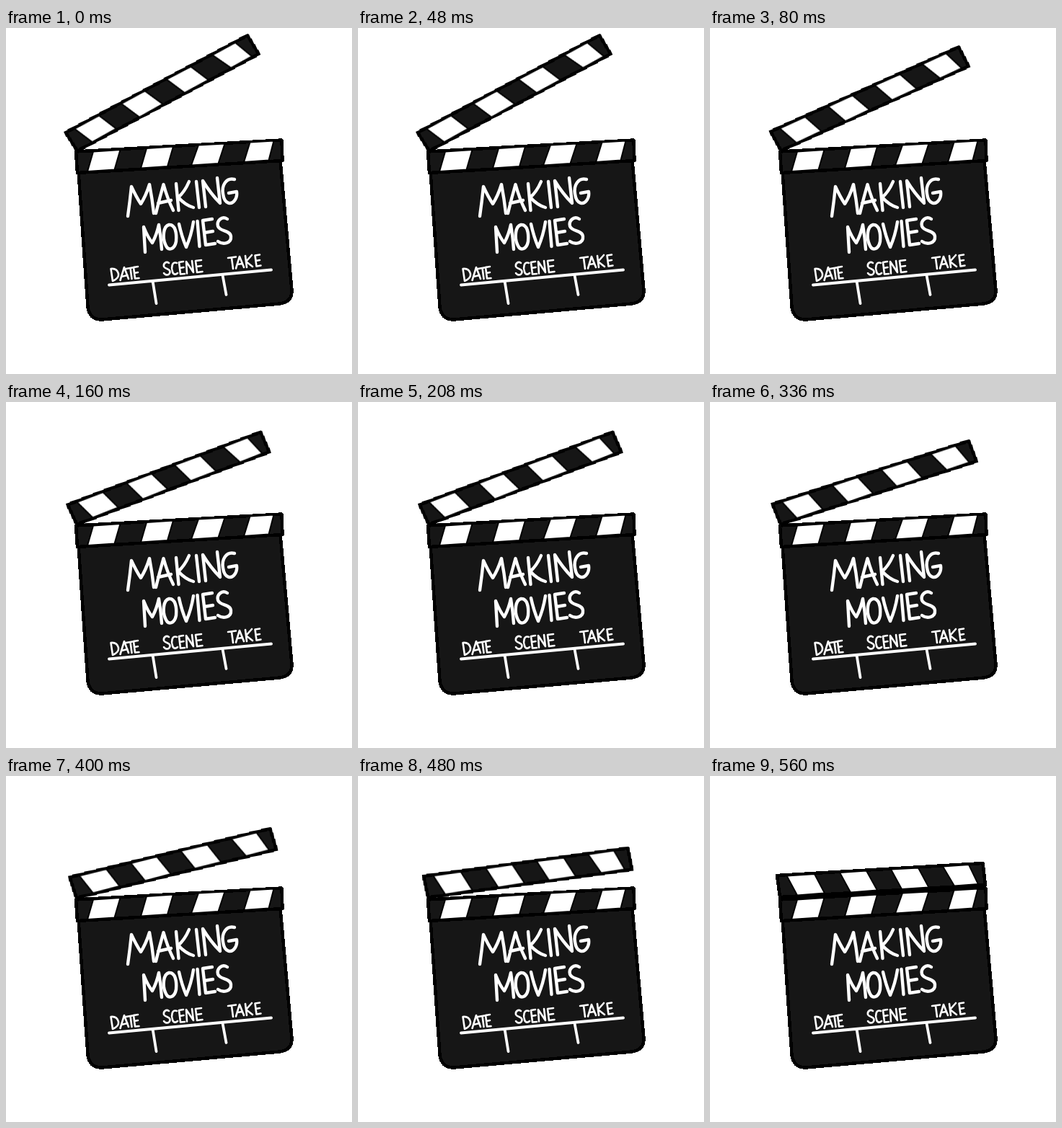
Recreate the animation shown at these times as an HTML page. Size 480x480 px, loop 0.64 s.

```html
<!DOCTYPE html>
<html lang="en">
<head>
<meta charset="utf-8">
<title>Making movies</title>
<style>
  html, body { margin: 0; width: 100%; height: 100%; overflow: hidden; background: #fff; }
  svg { display: block; width: 100%; height: 100%; }
  .board { fill: #161616; stroke: #000; stroke-width: 4.5; stroke-linejoin: round; shape-rendering: crispEdges; }
  .stripe { fill: #fff; stroke: #000; stroke-width: 2; }
  .ink { fill: none; stroke: #fff; stroke-linecap: round; stroke-linejoin: round; }
  .title { stroke-width: 4.4; }
  .label { stroke-width: 2.6; }
  .rule { stroke-width: 3.8; }
  #arm { transform-origin: 103.8px 165.1px; }
</style>
</head>
<body>
<svg viewBox="0 0 480 480" role="img" aria-label="Clapperboard: Making Movies. Date, Scene, Take">
  <path class="board" d="M100.500 199L113.500 387Q116 405 133 404.500L380 382.500Q397 380 396.500 364L380.500 183Z"/>
  <g id="base"><path class="board" d="M97 171.500L382.500 155.500L383.500 184L99 201Z"/></g>
  <g id="arm"><path class="board" d="M93 138L378.500 121L382 151L97 168Z"/></g>
  <g id="lettering"></g>
  <path class="ink rule" d="M143 356.500L368 335.500M203.500 351L208.500 382M300.500 343L305.500 370"/>
</svg>
<script>
  const NS = "http://www.w3.org/2000/svg";
  const LOOP = 640;

  function addPath(parent, className, d) {
    const path = document.createElementNS(NS, "path");
    path.setAttribute("class", className);
    path.setAttribute("d", d);
    parent.append(path);
  }

  const arm = document.getElementById("arm");
  const base = document.getElementById("base");
  const lettering = document.getElementById("lettering");

  // White stripes on both sticks
  for (const d of [
    "M106.500 138.500L145 136L159 162.500L121 165.500Z",
    "M180 134L217 131.500L232 158.500L195 161.500Z",
    "M251 129.500L289 127.500L303.500 154.500L266 157Z",
    "M323 125.500L359 123L372 150L339 152.500Z"
  ]) addPath(arm, "stripe", d);

  for (const d of [
    "M121 171.500L158.500 169L150.500 196.500L113 199Z",
    "M195 167L232 164.500L224 192L187 194.500Z",
    "M267 162.500L303.500 160.500L294.500 188L257 190.500Z",
    "M338.500 158.500L371.500 156.500L364.500 183.500L330 186Z"
  ]) addPath(base, "stripe", d);

  // Hand lettering, one stroke path per letter
  const words = [
    ["title", [
      "M169 261Q172 240 174 220Q181 235 187 244Q194 233 199 217Q203 238 205 257",
      "M208 257Q213 236 218.500 217Q224 237 232 253M211 243L229 239",
      "M236 216L239.500 253M254 213Q248 227 239 235Q249 246 260 249",
      "M264 213L268 249",
      "M277 248L273 212Q284 230 297 243L293 208",
      "M317 210C305 207 299 219 301 230C303 245 313 246 318 238Q321 233 320 227L309 229"
    ]],
    ["title", [
      "M193 311L191 276Q197 291 203 298Q209 287 212 273Q215 291 216 307",
      "M226 273C218 275 217 291 221 300C225 311 234 307 236 296C237 285 235 272 226 273Z",
      "M240 272Q244 290 250 304Q257 288 260 269",
      "M265.500 268L268.500 303",
      "M286 265L273 267L277 301L290 299M275 284L287 282",
      "M307 265C299 260 292 268 294 275C297 283 311 280 312 289C313 299 301 301 294 296"
    ]],
    ["label", [
      "M145.500 334L148 351Q157 347 156 341Q154 333 145.500 334",
      "M158.500 350L164 332L170 348M160 345L168.500 343",
      "M166.500 334L178 332M172.500 333L174.500 348",
      "M183 331L177 332L179 347.500L184.500 347M178 340L183 339"
    ]],
    ["label", [
      "M226 326C222 323 218 327 219 331C221 335 228 333 227.500 339C226 344 221 343 219 340",
      "M237 326C230 323 229 333 231 338C232 343 236 342 238 340",
      "M246 324L240 325L242 341.500L248 341M241 333L246.500 332",
      "M251 340.500L250 324L260 339L258 323",
      "M271 322L263 323L265 339L272.500 338M264 331L271 330"
    ]],
    ["label", [
      "M308 319L319 317.500M313 319L315 334",
      "M319 333.500L324 317L330 332M320.500 328L328 327",
      "M332 316L334 332M341 315L333 324L342 331",
      "M352 314.500L345.500 315.500L347.500 330.500L353.500 329.500M346.500 323L352 322"
    ]]
  ];
  for (const [size, letters] of words) {
    for (const d of letters) addPath(lettering, "ink " + size, d);
  }

  // [start in ms, opening angle in degrees]; each pose is held
  const poses = [
    [0, -24.7], [80, -20.8], [160, -17.2], [240, -14.4],
    [400, -10.2], [480, -4.4], [560, 0], [LOOP, 0]
  ];
  arm.animate(
    poses.map(([time, angle]) => ({
      offset: time / LOOP,
      transform: `rotate(${angle}deg)`,
      easing: "step-end"
    })),
    { duration: LOOP, iterations: Infinity }
  );
</script>
</body>
</html>
```
